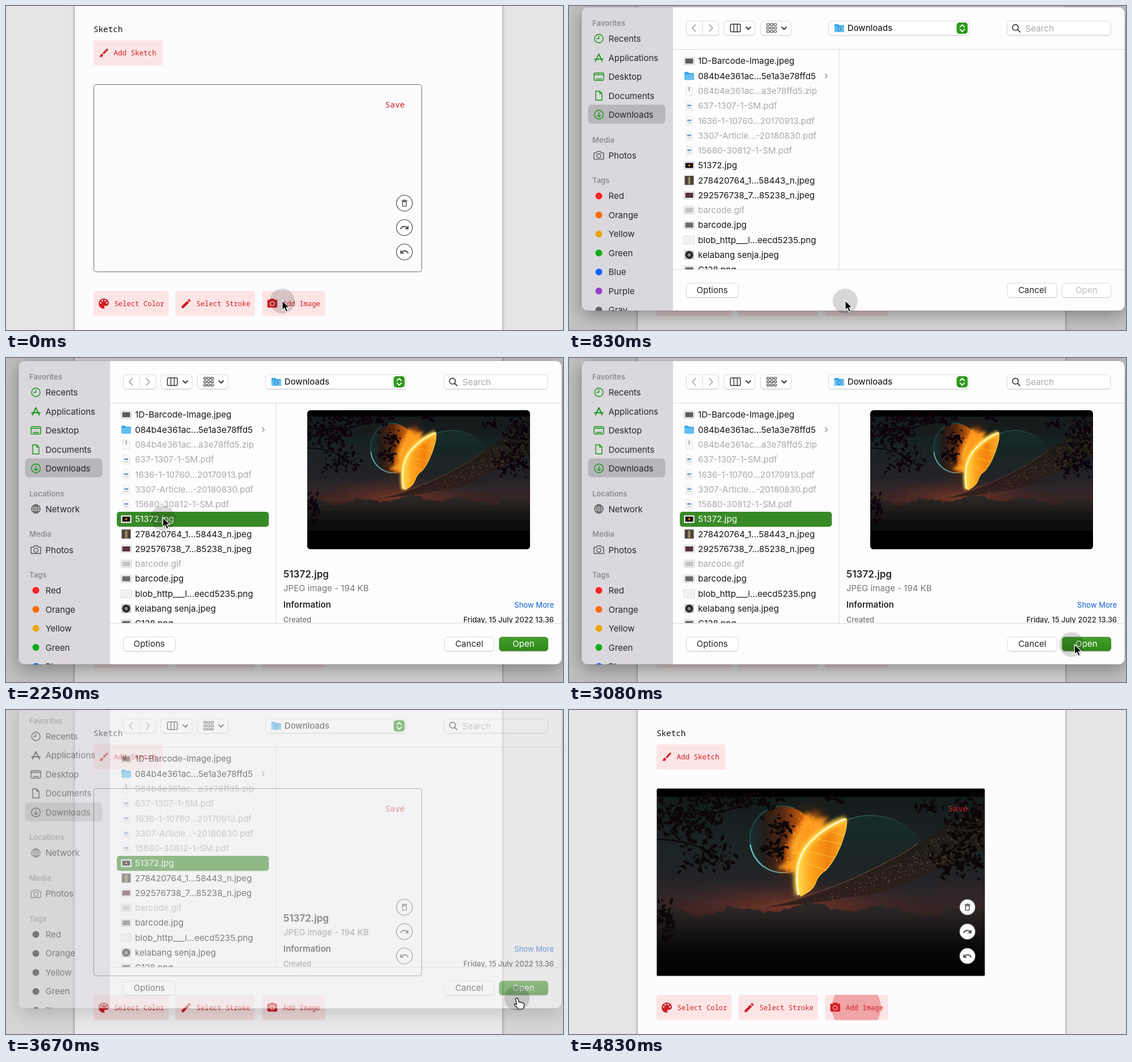
An HTML page for the animation above (4.91 s loop, 980 px wide and 571 px high).

```html
<!DOCTYPE html>
<html lang="en">
<head>
<meta charset="utf-8">
<title>Sketch field</title>
<style>
  html, body { margin: 0; width: 100%; height: 100%; overflow: hidden; background: #e5e5e6; }
  svg { display: block; width: 980px; height: 571px; }
  text { font-family: Inter, Roboto, sans-serif; font-size: 15px; fill: #262626; white-space: pre; }
  .mono { font-family: "Noto Sans Mono", "DejaVu Sans Mono", monospace; }
  .head { font-size: 13px; font-weight: 600; fill: #8d8b90; }
  .icon { fill: none; stroke: currentColor; stroke-width: 1.4; stroke-linecap: round; stroke-linejoin: round; }
  .inactive { color: #1b1b1b !important; }
  .inactive .tag { fill: #1b1b1b; }
  .field { fill: #fff; stroke: #dadada; }
  .line { stroke: #d9d9da; }
</style>
</head>
<body>
<svg id="stage" viewBox="0 0 980 571" xmlns="http://www.w3.org/2000/svg"></svg>
<script>
const LOOP = 4910, STEP = 1000 / 12;
const RED = '#d01f24';

let seed = 11;
const rand = () => (seed = (seed * 16807) % 2147483647) / 2147483647;
const spread = r => (rand() + rand() - 1) * r;

const text = (x, y, s, attrs = '') => `<text x="${x}" y="${y}" ${attrs}>${s}</text>`;
const rect = (x, y, w, h, r, attrs) => `<rect x="${x}" y="${y}" width="${w}" height="${h}" rx="${r}" ${attrs}/>`;
const circle = (x, y, r, attrs) => `<circle cx="${x}" cy="${y}" r="${r}" ${attrs}/>`;
const path = (d, attrs = '') => `<path d="${d}" ${attrs}/>`;
const at = (x, y, body, attrs = '') => `<g transform="translate(${x} ${y})" ${attrs}>${body}</g>`;
const glyph = (x, y, scale, d, fill) =>
  path(d, `transform="translate(${x} ${y}) scale(${scale}) translate(-12 -12)" fill="${fill}" fill-rule="evenodd"`);
const mono = (x, y, s, size, fill) => text(x, y, s, `class="mono" style="font-size:${size}px;fill:${fill}"`);

const ICON = {
  brush: 'M7 14c-1.66 0-3 1.34-3 3 0 1.31-1.16 2-2 2 .92 1.22 2.49 2 4 2 2.21 0 4-1.79 4-4 0-1.66-1.34-3-3-3zm13.71-9.37l-1.34-1.34c-.39-.39-1.02-.39-1.41 0L9 12.25 11.75 15l8.96-8.96c.39-.39.39-1.02 0-1.41z',
  palette: 'M12 3c-4.97 0-9 4.03-9 9s4.03 9 9 9c.83 0 1.5-.67 1.5-1.5 0-.39-.15-.74-.39-1.01-.23-.26-.38-.61-.38-.99 0-.83.67-1.5 1.5-1.5H16c2.76 0 5-2.24 5-5 0-4.42-4.03-8-9-8z' +
    [[6.5, 10.5], [9.5, 6.5], [14.5, 6.5], [17.5, 10.5]].map(([x, y]) => `M${x - 1.5} ${y}a1.5 1.5 0 1 0 3 0a1.5 1.5 0 1 0-3 0z`).join(''),
  pencil: 'M3 17.25V21h3.75L17.81 9.94l-3.75-3.75L3 17.25zM20.71 7.04c.39-.39.39-1.02 0-1.41l-2.34-2.34c-.39-.39-1.02-.39-1.41 0l-1.83 1.83 3.75 3.75 1.83-1.83z',
  camera: 'M9 2L7.17 4H4c-1.1 0-2 .9-2 2v12c0 1.1.9 2 2 2h16c1.1 0 2-.9 2-2V6c0-1.1-.9-2-2-2h-3.17L15 2H9zM7 12a5 5 0 1 0 10 0a5 5 0 1 0-10 0zM8.8 12a3.2 3.2 0 1 0 6.4 0a3.2 3.2 0 1 0-6.4 0z',
  trash: 'M6 19c0 1.1.9 2 2 2h8c1.1 0 2-.9 2-2V7H6v12zM8 9h8v10H8V9zm7.5-5l-1-1h-5l-1 1H5v2h14V4z',
  redo: 'M18.4 10.6C16.55 8.99 14.15 8 11.5 8c-4.65 0-8.58 3.03-9.96 7.22L3.9 16c1.05-3.19 4.05-5.5 7.6-5.5 1.95 0 3.73.72 5.12 1.88L13 16h9V7l-3.6 3.6z',
  undo: 'M5.6 10.6C7.45 8.99 9.85 8 12.5 8c4.65 0 8.58 3.03 9.96 7.22L20.1 16c-1.05-3.19-4.05-5.5-7.6-5.5-1.95 0-3.73.72-5.12 1.88L11 16H2V7l3.6 3.6z'
};

// Night scene, 578 x 331
function leaves(cx, cy, rx, ry, n) {
  let d = '';
  for (let i = 0; i < n; i++) {
    const a = rand() * 6.28, len = 3 + rand() * 5, x = cx + spread(rx), y = cy + spread(ry);
    const dx = Math.cos(a) * len, dy = Math.sin(a) * len;
    d += `M${(x - dx).toFixed(1)} ${(y - dy).toFixed(1)}l${(dx - dy * .45).toFixed(1)} ${(dy + dx * .45).toFixed(1)} ${(dx + dy * .45).toFixed(1)} ${(dy - dx * .45).toFixed(1)} ${(-dx + dy * .45).toFixed(1)} ${(-dy - dx * .45).toFixed(1)}z`;
  }
  return d;
}
const ringTop = x => 211 - 196 * Math.pow(Math.max(0, x - 168) / 410, 1.6);
function photo() {
  let ring = 'M168 211', lights = '', sparks = '', ridge = 'M0 331V190';
  for (let x = 188; x <= 578; x += 15) ring += `L${x} ${ringTop(x).toFixed(1)}`;
  ring += 'V105Q490 148 400 182Q290 204 168 211z';
  for (let i = 0; i < 230; i++) {
    const x = 270 + 300 * Math.sqrt(rand()), depth = 8 + rand() * (8 + (x - 270) * .2);
    lights += `M${x.toFixed(1)} ${(ringTop(x) + depth).toFixed(1)}v${(1 + rand() * 1.6).toFixed(1)}`;
  }
  for (let i = 0; i < 90; i++) {
    const k = rand();
    sparks += `M${(278 - 44 * k + spread(34)).toFixed(1)} ${(48 + 96 * k + spread(16)).toFixed(1)}l1.5-1`;
  }
  for (let x = 0; x <= 578; x += 9)
    ridge += `L${x} ${(213 + 7 * Math.cos((x - 72) / 21) + 5 * Math.sin(x / 61) + spread(6)).toFixed(1)}`;
  const wing = 'M334 53C300 62 264 96 252 124C243 148 244 172 254 190C266 184 276 178 280 166Q285 152 297 145C312 130 324 104 330 84Q336 66 334 53z';
  const edge = 'M332 54Q288 72 264 102Q240 134 250 188';
  const clumps = [[60, 55, 75, 48, 190], [150, 22, 95, 14, 80], [90, 118, 58, 40, 75], [215, 66, 34, 20, 35], [205, 106, 26, 20, 30],
    [12, 235, 20, 42, 60], [550, 55, 44, 50, 120], [530, 128, 58, 36, 110], [478, 32, 30, 14, 24], [312, 18, 20, 8, 16]];
  return rect(0, 0, 578, 331, 0, 'fill="#000"') + rect(0, 15, 578, 316, 0, 'fill="url(#sky)"') +
    '<ellipse cx="235" cy="208" rx="250" ry="52" fill="url(#dusk)"/>' +
    circle(375, 158, 110, 'fill="url(#moon)"') +
    path('M334 56A110 110 0 0 1 472 105', 'fill="none" stroke="url(#moonRim)" stroke-width="1.3"') +
    '<ellipse cx="252" cy="96" rx="58" ry="92" transform="rotate(28 252 96)" fill="url(#halo0)"/>' +
    circle(223, 90, 58, 'fill="url(#planet)"') +
    path('M243 35A58 58 0 0 0 165 99', 'fill="none" stroke="#245f60" stroke-width="1.4"') +
    path('M165 99A58 58 0 0 0 240 146', 'fill="none" stroke="url(#planetRim)" stroke-width="2.2"') +
    '<ellipse cx="258" cy="94" rx="30" ry="66" transform="rotate(26 258 94)" fill="url(#blast)"/>' +
    path('M263 42L277 56 302 50 290 68 322 56 268 106 248 148 212 140 238 126 246 98z', 'fill="#ff9a1c" filter="url(#glow)"') +
    path(sparks, 'stroke="#ffc04a" stroke-width="1.3"') +
    path(wing, 'fill="url(#wing)" stroke="#ffc83a" stroke-width="1.4"') +
    path('M262 110L312 122M254 128L298 144M276 88L324 98M250 150L274 172M295 74L329 82', 'stroke="#ffcf4c" stroke-width="1.4" opacity=".55"') +
    path(edge, 'fill="none" stroke="#ffd545" stroke-width="11" filter="url(#glow)"') +
    path(edge, 'fill="none" stroke="#fff3b4" stroke-width="4"') +
    path(ring, 'fill="url(#ring)"') +
    path('M168 211Q270 194 350 157T460 97', 'fill="none" stroke="#6b4531" stroke-width="1.2"') +
    path(lights, 'stroke="#b39a5c" stroke-width="1" opacity=".6"') +
    path(ridge + 'V331z', 'fill="url(#ridge)"') +
    path(clumps.map(c => leaves(...c)).join(''), 'fill="#0c0607"') +
    path('M0 40Q90 55 150 30M0 90Q80 90 130 140M578 60Q540 100 490 125', 'fill="none" stroke="#0c0607" stroke-width="2.5"');
}

const stops = list => list.map(([o, c, a = 1]) => `<stop offset="${o}" stop-color="${c}" stop-opacity="${a}"/>`).join('');
const vertical = (id, list) => `<linearGradient id="${id}" x1="0" y1="0" x2="0" y2="1">${stops(list)}</linearGradient>`;
const across = (id, list) => `<linearGradient id="${id}">${stops(list)}</linearGradient>`;
const radial = (id, list) => `<radialGradient id="${id}">${stops(list)}</radialGradient>`;

const defs = `<defs>
  ${vertical('sky', [[0, '#131b1b'], [.3, '#1c2425'], [.45, '#232326'], [.56, '#30262a'], [.63, '#3a2422'], [.74, '#1d1615'], [1, '#000']])}
  ${vertical('moon', [[0, '#152c2a'], [.4, '#1a2626', .6], [.65, '#232326', 0]])}
  ${vertical('ridge', [[0, '#332d2c'], [.22, '#272322'], [.45, '#161413'], [.7, '#060606'], [1, '#000']])}
  ${vertical('ring', [[0, '#171a18'], [.5, '#221d19'], [1, '#33201b']])}
  ${vertical('open', [[0, '#43a02c'], [1, '#2f8719']])}
  ${across('moonRim', [[0, '#3c7068'], [.5, '#29524d'], [1, '#1c2425']])}
  ${across('planetRim', [[0, '#74cbd6'], [.55, '#58a0a8'], [1, '#c87a30']])}
  ${across('planet', [[0, '#14302f'], [.22, '#241c18'], [.5, '#5a2810'], [.75, '#b8560e'], [1, '#f28a16']])}
  ${across('wing', [[0, '#ffdc58'], [.3, '#ffa41c'], [.65, '#f0820e'], [1, '#ffb02a']])}
  ${radial('dusk', [[0, '#8a3b26', .75], [.5, '#6b3024', .4], [1, '#3a2422', 0]])}
  ${radial('halo0', [[0, '#c4560c', .7], [.6, '#7a330c', .3], [1, '#40200e', 0]])}
  ${radial('blast', [[0, '#fff08a'], [.35, '#ffc233', .95], [.7, '#f77f12', .65], [1, '#c4490a', 0]])}
  <filter id="glow" x="-30%" y="-30%" width="160%" height="160%"><feGaussianBlur stdDeviation="3.5"/></filter>
  <filter id="sheetShadow" filterUnits="userSpaceOnUse" x="-60" y="-100" width="1100" height="760"><feDropShadow dx="0" dy="8" stdDeviation="16" flood-opacity=".34"/></filter>
  <filter id="paperShadow" filterUnits="userSpaceOnUse" x="90" y="-60" width="820" height="700"><feDropShadow dx="0" dy="1" stdDeviation="2.6" flood-opacity=".45"/></filter>
  <filter id="soft" x="-20%" y="-40%" width="140%" height="180%"><feDropShadow dx="0" dy=".6" stdDeviation=".6" flood-opacity=".2"/></filter>
  <clipPath id="sheetClip">${rect(22, 5, 956, 535, 11, '')}</clipPath>
  <clipPath id="listClip">${rect(183, 80, 795, 387, 0, '')}</clipPath>
  <clipPath id="canvasClip">${rect(0, 0, 578, 331, 4, '')}</clipPath>
  <clipPath id="previewClip">${rect(530, 92, 392, 245, 6, '')}</clipPath>
  <clipPath id="addClip">${rect(450.5, 502, 111, 44.5, 4, '')}</clipPath>
  <g id="photo">${photo()}</g>
</defs>`;

// Form page
const pinkButton = (x, y, w) => rect(x, y, w, 44.5, 4, 'fill="#fde5e6"');
const roundButton = (y, icon, scale) =>
  circle(701, y, 14, 'fill="#fdfdfe" stroke="#4a4a4a" stroke-width="1.2"') + glyph(701, y, scale, ICON[icon], '#4a4a4a');
const page = rect(0, 0, 980, 571, 0, 'fill="#e5e5e6"') +
  rect(121, -30, 752, 640, 0, 'fill="#fcfcfe" filter="url(#paperShadow)"') +
  mono(154, 46, 'Sketch', 14.25, '#111') +
  pinkButton(154, 60.5, 121.5) + glyph(172.5, 82.5, .82, ICON.brush, RED) + mono(189.5, 87, 'Add Sketch', 12.5, RED) +
  at(154, 138, '<g clip-path="url(#canvasClip)"><use href="#photo"/></g>', 'id="canvasPhoto"') +
  rect(154.5, 138.5, 577, 330, 4, 'fill="none" stroke="#6b6b6d"') +
  mono(667, 179, 'Save', 14.5, RED) +
  roundButton(347.5, 'trash', .68) + roundButton(390.5, 'redo', .72) + roundButton(433.5, 'undo', .72) +
  pinkButton(154, 502, 132) + glyph(172, 524.5, 1, ICON.palette, RED) + mono(190.5, 529, 'Select Color', 12.2, RED) +
  pinkButton(298, 502, 140) + glyph(317, 524.5, .88, ICON.pencil, RED) + mono(335, 529, 'Select Stroke', 12.2, RED) +
  pinkButton(450.5, 502, 111) +
  `<g clip-path="url(#addClip)">${circle(505.5, 524.3, 47, `id="ripple" fill="${RED}" opacity=".33"`)}</g>` +
  glyph(468.5, 524.5, .87, ICON.camera, RED) + mono(487, 529, 'Add Image', 12.2, RED);

// File dialog
const SIDE_ICON = {
  Recents: circle(0, 0, 7.5, '') + path('M0-4.5V0H-4'),
  Applications: path('M-6 6.5L0-6.5 6 6.5M-7.5 2.5H7.5', 'stroke-width="1.8"'),
  Desktop: rect(-8.5, -6.5, 17, 13, 2, '') + path('M-8-3.5H8M-5 3.8H5'),
  Documents: path('M-5.5-8H1.5L5.5-4V8H-5.5zM1.5-8V-4H5.5'),
  Downloads: circle(0, 0, 7.8, '') + path('M0-4V4M-3 1L0 4 3 1'),
  Network: circle(0, 0, 7.5, '') + '<ellipse rx="3.4" ry="7.5"/>' + path('M-7.5 0H7.5M0-7.5V7.5M-6.3-4H6.3M-6.3 4H6.3', 'stroke-width="1"'),
  Photos: path('M-8.5-4.5H-4.5L-3-7H3L4.5-4.5H8.5V6.5H-8.5z') + circle(0, .7, 3.6, '')
};
const place = (name, y, gray) =>
  at(52.5, y, SIDE_ICON[name], `class="icon" ${gray ? 'style="stroke:#555"' : ''}`) + text(69.5, y + 5.5, name);
const tags = [['Red', '#fb2023'], ['Orange', '#fc6a05'], ['Yellow', '#eba404'], ['Green', '#07ad17'],
  ['Blue', '#0a66fb'], ['Purple', '#9a3acb'], ['Gray', '#666']];
const sidebar = rect(22, 5, 161, 535, 0, 'fill="#dbd8dd"') + rect(33.5, 177, 136, 33.3, 6, 'fill="#b8b6ba"') +
  text(41, 38.3, 'Favorites', 'class="head"') +
  ['Recents', 'Applications', 'Desktop', 'Documents', 'Downloads'].map((n, i) => place(n, 60.5 + i * 33.5)).join('') +
  `<g id="locations">${text(41, 243.5, 'Locations', 'class="head"')}${place('Network', 266, true)}</g>` +
  `<g id="lowerPlaces">${text(41, 315.3, 'Media', 'class="head"')}${place('Photos', 338, true)}` +
  text(41, 387, 'Tags', 'class="head"') +
  tags.map(([n, c], i) => circle(52.5, 409.5 + i * 33.5, 6, `class="tag" fill="${c}"`) + text(69.5, 415 + i * 33.5, n)).join('') + '</g>';

const folder = (x, y) => at(x, y, path('M-8.5-5.5Q-8.5-7-7-7H-2L0-5H7Q8.5-5 8.5-3.5V5.5Q8.5 7 7 7H-7Q-8.5 7-8.5 5.5z', 'fill="#38a3e4"') + rect(-8.5, -3, 17, 10, 1.5, 'fill="#63bff2"'));
const thumb = fill => rect(-9, -6.5, 18, 13, .5, 'fill="#fff" stroke="#bbb" stroke-width=".8"') + rect(-7, -4.5, 14, 9, 0, `fill="${fill}"`);
const sheetIcon = mark => path('M-5.5-8H2L6-4V8H-5.5z', 'fill="#fafafa" stroke="#ddd" stroke-width=".8"') + mark;
const pdf = sheetIcon(rect(-3.5, -2, 7, 3, 0, 'fill="#7d9cc6"') + path('M-3.5 4H3.5', 'stroke="#aaa"'));
const files = [
  ['1D-Barcode-Image.jpeg', thumb('#5b5b5b')],
  ['084b4e361ac...5e1a3e78ffd5', folder(0, 0)],
  ['084b4e361ac...a3e78ffd5.zip', sheetIcon(rect(-1, -7, 2, 7, 0, 'fill="#999"')), true],
  ['637-1307-1-SM.pdf', pdf, true],
  ['1636-1-10760...20170913.pdf', pdf, true],
  ['3307-Article...-20180830.pdf', pdf, true],
  ['15680-30812-1-SM.pdf', pdf, true],
  ['51372.jpg', thumb('#15100e') + circle(0, 0, 1.8, 'fill="#e78a1c"')],
  ['278420764_1...58443_n.jpeg', rect(-8, -8, 16, 16, 0, 'fill="#4b4338"') + rect(-2, -6, 4, 13, 0, 'fill="#9a8b68"')],
  ['292576738_7...85238_n.jpeg', thumb('#59303a')],
  ['barcode.gif', thumb('#c4c4c4'), true],
  ['barcode.jpg', thumb('#6a6a6a')],
  ['blob_http___l...eecd5235.png', thumb('#eef0f2')],
  ['kelabang senja.jpeg', rect(-8.5, -8, 17, 16, 1, 'fill="#ccc"') + circle(0, 0, 7, 'fill="#252525"') + circle(0, 0, 3, 'fill="#7b8b82"')],
  ['C128.png', thumb('#666')]
];
const fileRows = files.map(([name, icon, off], i) => {
  const y = 100 + i * 26.28;
  return at(211.5, y, icon) + text(227, y + 5.4, name, `${i === 7 ? 'id="pickedName"' : ''} style="font-size:15.1px;fill:${off ? '#a9a9aa' : '#151515'}"`);
}).join('');

const chevron = (x, y, d, color = '#222', w = 1.8) =>
  path(`M${x} ${y}${d}`, `fill="none" stroke="${color}" stroke-width="${w}" stroke-linecap="round" stroke-linejoin="round"`);
const field = (x, w, y = 29.5, h = 25) => rect(x, y, w, h, 5.5, 'class="field" filter="url(#soft)"');
let gridDots = '';
for (let i = 0; i < 9; i++) gridDots += rect(348 + (i % 3) * 6.3, 34 + Math.floor(i / 3) * 6, 4.4, 3.4, .6, 'fill="none" stroke="#333" stroke-width="1.1"');
const toolbar = field(206.5, 57) + path('M235 30V54', 'class="line"') +
  chevron(222.5, 36, 'l-5.5 6 5.5 6', '#999', 1.5) + chevron(247, 36, 'l5.5 6-5.5 6', '#999', 1.5) +
  field(272.5, 55) + rect(284, 35, 17.5, 13.5, 2, 'fill="none" stroke="#333" stroke-width="1.5"') +
  path('M290 35V48M296 35V48', 'stroke="#333" stroke-width="1.4"') + chevron(311.5, 40.2, 'l4 4 4-4') +
  field(337, 54) + gridDots + chevron(374.5, 40.2, 'l4 4 4-4') +
  field(456.5, 247.5) + folder(475.5, 42) + circle(475.5, 43.5, 3.2, 'fill="none" stroke="#1b75b5" stroke-width="1"') +
  text(490, 46.8, 'Downloads', 'font-weight="500" style="font-size:14.8px"') +
  rect(682, 32, 19.5, 20, 5, 'fill="#2f9a1b"') + chevron(688, 39.8, 'l3.8-3.8 3.8 3.8', '#fff') + chevron(688, 44.2, 'l3.8 3.8 3.8-3.8', '#fff') +
  field(771, 182) + circle(785.5, 40.8, 5.2, 'fill="none" stroke="#333" stroke-width="1.6"') + chevron(789.5, 44.8, 'l4 4', '#333') +
  text(803, 47.6, 'Search', 'style="font-size:15.1px;fill:#aaa"');

const info = `<g id="info">` +
  text(488, 387, '51372.jpg', 'font-weight="600" style="font-size:17px"') +
  text(488, 411.2, 'JPEG image - 194 KB', 'style="fill:#777"') +
  text(488, 440, 'Information', 'font-weight="600"') +
  text(964, 439.7, 'Show More', 'text-anchor="end" style="font-size:13px;fill:#0a5cd0"') +
  text(488, 466, 'Created', 'font-weight="500" style="font-size:12.9px;fill:#777"') +
  text(964, 466, 'Friday, 15 July 2022 13.36', 'text-anchor="end" font-weight="500" style="font-size:12.9px"') + '</g>' +
  `<g id="preview" clip-path="url(#previewClip)"><use href="#photo" transform="translate(530 92) scale(${392 / 578} ${245 / 331})"/></g>`;

const footer = field(206.5, 91.5, 491.5) + text(252, 509, 'Options', 'text-anchor="middle"') +
  field(771.5, 87, 491.5) + text(815, 509, 'Cancel', 'text-anchor="middle"') +
  field(867.5, 86, 491.5) + rect(867.5, 491.5, 86.5, 25, 5.5, 'id="openFill" fill="url(#open)"') +
  text(910.5, 509, 'Open', 'id="openText" text-anchor="middle"');

const sheet = `<g id="sheet"><g filter="url(#sheetShadow)"><g clip-path="url(#sheetClip)">` +
  rect(22, 5, 956, 535, 0, 'fill="#fdfdfe"') + `<g id="sidebar" style="color:#119611">${sidebar}</g>` + toolbar +
  `<g clip-path="url(#listClip)">` + rect(195, 271, 267.5, 26.5, 5, 'id="picked" fill="#388a27"') + fileRows +
  chevron(451, 122.5, 'l3.4 3.7-3.4 3.7', '#888', 1.3) + info + '</g>' +
  path('M183 79.5H978M183 467.5H978M475 80V467', 'class="line"') + footer + '</g>' +
  rect(22, 5, 956, 535, 11, 'fill="none" stroke="#000" stroke-opacity=".2" stroke-width=".8"') + '</g></g>';

const pointer = circle(0, 0, 22, 'id="halo" opacity=".15"') + '<g id="cursor">' +
  path('M0 0V17L3.9 13.4 6.7 20 9.8 18.7 7 12.3H12.3z', 'id="arrow" fill="#000" stroke="#fff" stroke-width="1.2"') +
  path('M-1.5 1Q1 0 2 2.5L3.5 8Q6 6.5 7 8.5Q9.5 7.5 10.2 9.7Q12.6 9.4 12.8 12Q13 16 10.5 20H2Q0 16-4.5 13Q-5.5 10.5-2.5 10.8L-.3 12-2.6 3.5Q-3 1.7-1.5 1z', 'id="hand" fill="#fff" stroke="#000" stroke-width="1.2"') + '</g>';

document.getElementById('stage').innerHTML = defs + page + rect(0, 0, 980, 571, 0, 'id="dim"') + sheet + pointer;

const el = {};
document.querySelectorAll('#stage [id]').forEach(n => el[n.id] = n);
const show = (node, on) => node.style.display = on ? '' : 'none';

// Rows: time, values...
const CURSOR = [[0, 486, 519], [1167, 486, 519], [1250, 468, 497], [1333, 400, 405], [1417, 339, 337], [1500, 300, 304],
  [1583, 281, 285], [1667, 276, 281], [2333, 276, 281], [2417, 292, 290], [2500, 370, 330], [2583, 510, 385],
  [2667, 660, 435], [2750, 775, 470], [2833, 845, 490], [2917, 871, 499], [3000, 880, 503], [3167, 899, 507],
  [4250, 899, 507], [4333, 906, 520], [4417, 922, 550], [4500, 932, 570], [4583, 932, 570], [4667, 934, 580], [4750, 936, 600], [4833, 940, 650]];
// Rows: time, offset, opacity, page dimming
const SHEET = [[250, -62, 0, 0], [333, -58, .1, .02], [500, -44, .6, .07], [583, -33, .84, .1], [667, -21.5, .95, .12],
  [750, -10, 1, .14], [833, -3, 1, .15], [917, 0, 1, .16], [3417, 0, 1, .16], [3500, -1, .97, .15],
  [3583, -5, .89, .12], [3667, -14, .5, .07], [3750, -24, .12, .02], [3833, -30, 0, 0]];

function track(rows, t) {
  const next = rows.findIndex(r => r[0] > t);
  if (next < 1) return (next ? rows[rows.length - 1] : rows[0]).slice(1);
  const a = rows[next - 1], b = rows[next], k = (t - a[0]) / (b[0] - a[0]);
  return a.slice(1).map((v, i) => v + (b[i + 1] - v) * k);
}

function draw(ms) {
  const t = Math.floor((ms + 4) / STEP) * STEP + .4;
  const [dy, alpha, dim] = track(SHEET, t);
  show(el.sheet, alpha > .005);
  el.sheet.setAttribute('transform', `translate(0 ${dy.toFixed(2)})`);
  el.sheet.setAttribute('opacity', alpha.toFixed(3));
  el.dim.setAttribute('opacity', dim.toFixed(3));

  const hasLocations = t > 900, picked = t > 1910, ready = t > 1990;
  show(el.locations, hasLocations);
  el.lowerPlaces.setAttribute('transform', `translate(0 ${hasLocations ? 0 : -71.7})`);
  el.sidebar.classList.toggle('inactive', t > 3490);
  show(el.picked, picked);
  el.pickedName.style.fill = picked ? '#fff' : '#151515';
  show(el.info, ready);
  show(el.preview, t > 2160 && t < 3570);
  show(el.openFill, ready);
  el.openText.style.fill = ready ? '#fff' : '#bdbdbe';

  show(el.canvasPhoto, t > 3820);
  show(el.ripple, t > 3820);
  el.ripple.setAttribute('r', 47.1 * (1 - .04 * (1 - Math.cos((t - 3650) / 2500 * 2 * Math.PI))));

  const [x, y] = track(CURSOR, t), [hx, hy] = track(CURSOR, t - 45);
  el.cursor.setAttribute('transform', `translate(${x} ${y})`);
  el.halo.setAttribute('transform', `translate(${hx} ${hy + 1})`);
  show(el.halo, t < 4820);
  const hand = t > 3490 && t < 3820;
  show(el.hand, hand);
  show(el.arrow, !hand);
}

const start = performance.now();
function tick() {
  draw((performance.now() - start) % LOOP);
  requestAnimationFrame(tick);
}
tick();
</script>
</body>
</html>
```
